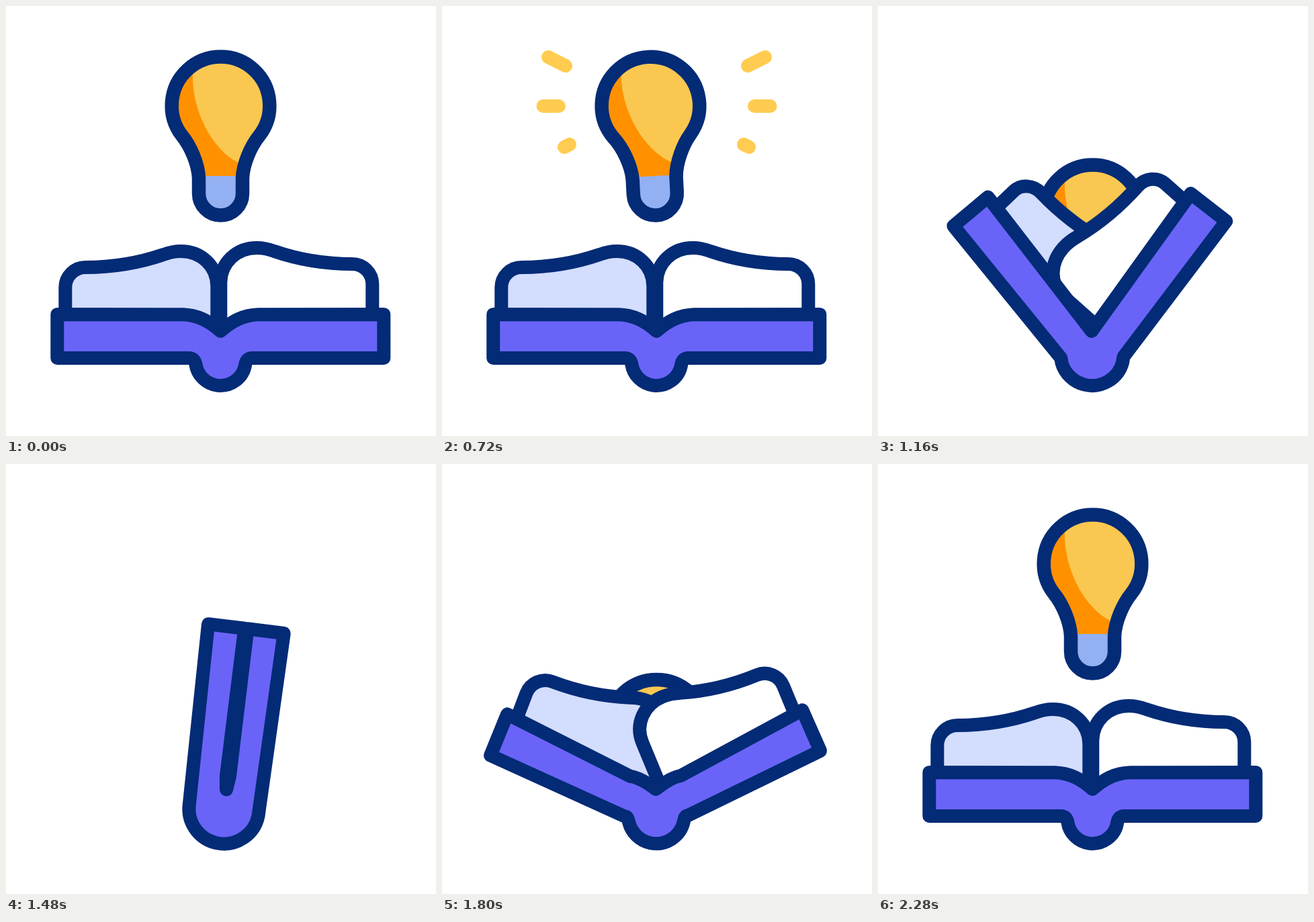
An HTML page with a canvas for the animation above (2.4 s loop, 640 px wide and 640 px high).

```html
<!DOCTYPE html>
<html lang="en">
<head>
<meta charset="utf-8">
<title>Book and bulb</title>
<style>
  html, body { margin: 0; width: 100%; height: 100%; overflow: hidden; background: #fff; }
  canvas { display: block; width: 640px; height: 640px; }
</style>
</head>
<body>
<canvas id="stage" width="640" height="640"></canvas>
<script>
const ctx = document.getElementById('stage').getContext('2d');
const LOOP = 2400, STEP = 40;
const NAVY = '#042b76', PURPLE = '#6964f7', PAGE = '#d3ddfe', WHITE = '#fff';
const ORANGE = '#ff9100', YELLOW = '#fac850', BASE = '#93b0f2', RAY = '#ffcb50';
const RAD = Math.PI / 180;
const AXIS = 319.3, FOLD = 484;   // the point where both covers meet
const CLOSED = 83.6;              // degrees each cover turns
const TILT = [[1040, 0], [1160, -1], [1300, -1], [1480, 7], [1660, -1], [1800, -.8], [1920, 0]];

const bulbShape = new Path2D(
  'M262 193A72.8 72.8 0 1 1 377 193C364 209 353 235 352 256V279A32.5 32.5 0 0 1 287 279V256C286 235 275 209 262 193Z');
const bulbLight = new Path2D('M278 60V100C276 150 303 212 347 234L400 260V60Z');
const pageShape = new Path2D(
  'M0 0V-72C0 -102 24 -124 54 -124C64 -124 72 -122 80 -119C118 -106 155 -100 196 -100A30 30 0 0 1 226 -70V-20Z');

// Ray ends on the right side, inner end first
const RAYS = [[455, 89, 481, 76], [465, 149, 488.5, 149], [449, 206, 457, 210]];

const mix = (a, b, k) => a + (b - a) * k;

function ease(t, from, to) {
  const k = Math.min(1, Math.max(0, (t - from) / (to - from)));
  return k * k * (3 - 2 * k);
}

function keyed(t, keys) {
  let value = keys[0][1];
  for (let i = 1; i < keys.length; i++) {
    value += (keys[i][1] - keys[i - 1][1]) * ease(t, keys[i - 1][0], keys[i][0]);
  }
  return value;
}

const polar = (r, deg) => [r * Math.cos(deg * RAD), -r * Math.sin(deg * RAD)];

function paint(shape, fill) {
  ctx.fillStyle = fill;
  ctx.strokeStyle = NAVY;
  ctx.lineWidth = 20;
  ctx.fill(shape);
  ctx.stroke(shape);
}

function turn(x, y, deg) {
  ctx.translate(x, y);
  ctx.rotate(deg * RAD);
  ctx.translate(-x, -y);
}

function drawRays(t) {
  const head = ease(t, 570, 700), tail = ease(t, 840, 960);
  if (head <= 0 || tail >= 1) return;
  ctx.strokeStyle = RAY;
  ctx.lineWidth = 20;
  ctx.beginPath();
  for (const [x1, y1, x2, y2] of RAYS) {
    for (const side of [-1, 1]) {
      const at = k => [319.5 + side * (mix(x1, x2, k) - 319.5), mix(y1, y2, k)];
      ctx.moveTo(...at(tail));
      ctx.lineTo(...at(head));
    }
  }
  ctx.stroke();
}

function drawBulb(t, angle) {
  const swing = t < 736 ? 22.1 * Math.sin(2 * Math.PI * t / 736) : 0;
  const drop = 250 * (ease(t, 997, 1270) - ease(t, 1760, 2260));
  ctx.save();
  if (drop > 0) {
    // Only the part between the covers can be seen
    const [x, y] = polar(900, angle + 5.9);
    ctx.beginPath();
    ctx.moveTo(AXIS, FOLD);
    ctx.lineTo(AXIS + x, FOLD + y);
    ctx.lineTo(AXIS + x, -900);
    ctx.lineTo(AXIS - x, -900);
    ctx.lineTo(AXIS - x, FOLD + y);
    ctx.clip();
  }
  ctx.translate(0, drop);
  turn(319.5, 321, swing);
  ctx.save();
  ctx.clip(bulbShape);
  ctx.fillStyle = ORANGE;
  ctx.fillRect(230, 60, 180, 194);
  ctx.fillStyle = YELLOW;
  ctx.fill(bulbLight);
  ctx.fillStyle = BASE;
  ctx.fillRect(230, 253, 180, 70);
  ctx.restore();
  ctx.strokeStyle = NAVY;
  ctx.lineWidth = 20.5;
  ctx.stroke(bulbShape);
  ctx.restore();
}

function drawPage(side, angle, fill) {
  const u = angle / CLOSED;
  const [x, y] = side < 0 ? [5, 5] : [11 * Math.sin(Math.PI * u), 0];
  const m = new DOMMatrix().scale(side, 1).rotate(-angle)
    .scale(1, 1 - .65 * u ** 3.7).translate(x, y);
  const shape = new Path2D();
  shape.addPath(pageShape, m);
  paint(shape, fill);
}

function drawCover(angle) {
  const u = angle / CLOSED, flat = Math.max(0, 1 - angle / 48);
  const late = u ** 4, reach = Math.sin(Math.PI * u) ** 3;
  const rim = angle + 5.9;
  const top = polar(244.3 + 9 * reach - 3 * late, rim);
  const outer = polar(246.3 + 13 * reach + 1.5 * late, angle - 9.35 + 2.5 * late);
  const knee = polar(mix(20, 61, flat), Math.max(24, rim));
  knee[0] = Math.max(2.5, knee[0]);
  const bend = [mix(knee[0] / 2, 26, flat), mix(knee[1] / 2, -24, flat)];
  const s = 37 + 15 * u, sy = 49 - 16 * u ** 3;
  const joint = [Math.max(47, s), 40 - 8 * u ** 3];
  const hip = [s + 2 * (1 - u), joint[1]];
  const h = 81 - sy, r = (s * s + h * h) / (2 * h);
  const a = Math.atan2(h - r, s);
  const flip = ([x, y]) => [-x, y];

  const p = new Path2D();
  p.moveTo(0, 0);
  p.quadraticCurveTo(...bend, ...knee);
  p.lineTo(...top);
  p.lineTo(...outer);
  p.lineTo(...joint);
  p.quadraticCurveTo(...hip, s, sy);
  p.arc(0, 81 - r, r, -a, Math.PI + a);
  p.quadraticCurveTo(...flip(hip), ...flip(joint));
  p.lineTo(...flip(outer));
  p.lineTo(...flip(top));
  p.lineTo(...flip(knee));
  p.quadraticCurveTo(...flip(bend), 0, 0);
  p.closePath();
  paint(p, PURPLE);
}

function draw(t) {
  const angle = CLOSED * (ease(t, 855, 1415) - ease(t, 1490, 1955));
  ctx.fillStyle = WHITE;
  ctx.fillRect(0, 0, 640, 640);
  ctx.lineCap = ctx.lineJoin = 'round';
  drawRays(t);
  drawBulb(t, angle);
  ctx.save();
  turn(AXIS, 555, keyed(t, TILT));
  ctx.translate(AXIS, FOLD);
  drawPage(-1, angle, PAGE);
  drawPage(1, angle, WHITE);
  drawCover(angle);
  ctx.restore();
}

const start = performance.now();
function tick() {
  const t = (performance.now() - start) % LOOP;
  draw(Math.min(2280, Math.floor(t / STEP) * STEP));
  requestAnimationFrame(tick);
}
tick();
</script>
</body>
</html>
```
